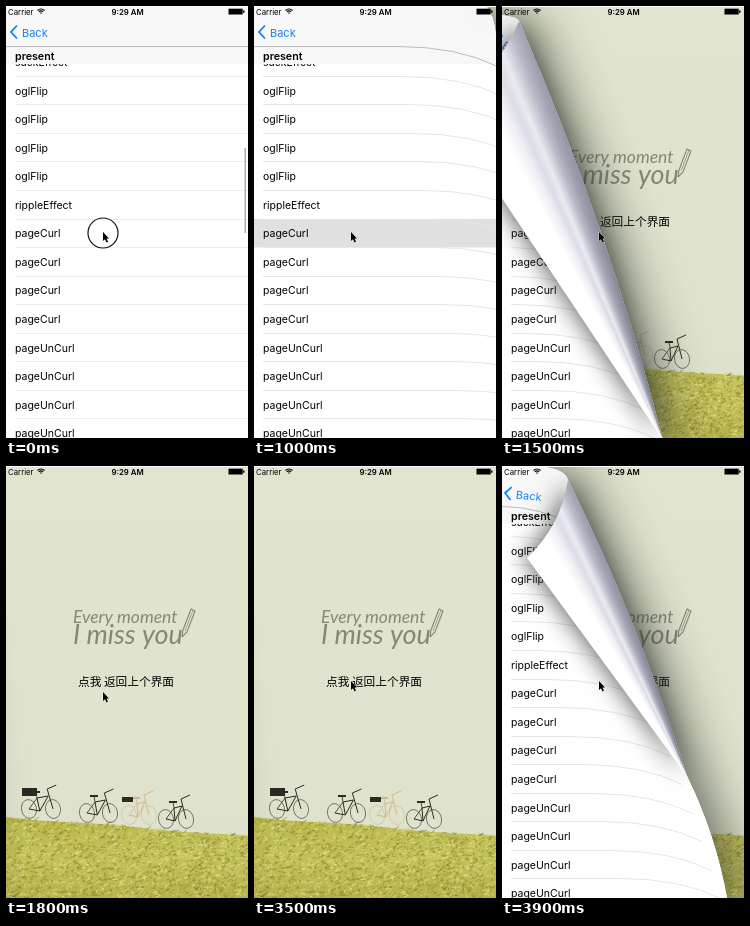
An HTML page with a canvas that plays this animation: 242x432 px, repeating every 4 s.

```html
<!DOCTYPE html>
<html lang="en">
<head>
<meta charset="utf-8">
<title>Page curl transition</title>
<style>
  html, body { margin: 0; width: 100%; height: 100%; overflow: hidden; background: #fff; }
  canvas { display: block; width: 242px; height: 432px; }
</style>
</head>
<body>
<canvas id="stage" width="242" height="432"></canvas>
<script>
const W = 242, H = 432, LOOP = 4000, STEP = 100;
const ctx = document.getElementById('stage').getContext('2d');
const UI = 'Inter, "Liberation Sans", sans-serif';
const ROWS = ['suckEffect', 'oglFlip', 'oglFlip', 'oglFlip', 'oglFlip', 'rippleEffect',
  'pageCurl', 'pageCurl', 'pageCurl', 'pageCurl',
  'pageUnCurl', 'pageUnCurl', 'pageUnCurl', 'pageUnCurl'];
const ROW_H = 28.55, FIRST_ROW = 56;

// Curl poses: progress, then x,y of top bend, roll top, loose corner, roll end, page edge.
const POSES = [
  [0,    242, 0,  242, 0,  242, 0,    242, 0,   242, 0],
  [.352, 70, 0,   132, 20, 128, 59,   196, 141, 243, 405],
  [.5,   25, 0,   66, 14,  25, 92,    185, 310, 225, 432],
  [.648, -30, 8,  17, 15,  -60, 102,  161, 434, 161, 434],
  [1,    -140, 8, -90, 20, -200, 150, -60, 440, -60, 440]
];

const clamp = v => Math.max(0, Math.min(1, v));
const mix = (a, b, k) => a + (b - a) * k;
const smooth = v => { v = clamp(v); return v * v * (3 - 2 * v); };

function text(g, str, x, y, font, color = '#000', align = 'left') {
  g.font = font;
  g.fillStyle = color;
  g.textAlign = align;
  g.textBaseline = 'alphabetic';
  g.fillText(str, x, y);
}

function line(g, color, width, ...pts) {
  g.strokeStyle = color;
  g.lineWidth = width;
  g.beginPath();
  for (let i = 0; i < pts.length; i += 2) g.lineTo(pts[i], pts[i + 1]);
  g.stroke();
}

function bike(g, x, y, w, color) {
  const wheel = cx => {
    g.strokeStyle = color + 'bb';
    g.lineWidth = .8;
    g.beginPath();
    g.ellipse(cx, y, 7.5, 9.5, -.2, 0, 7);
    g.stroke();
  };
  wheel(x);
  wheel(x + w);
  const mid = x + w * .45, head = x + w * .8;
  line(g, color, 1, x, y, mid, y + 2, head, y - 13, x + 8, y - 11, mid, y + 2);
  line(g, color, .8, x, y, x + 8, y - 11, x + 7, y - 17);
  line(g, color, 1, x + w, y, head - 1, y - 20, head + 8, y - 24);
  line(g, color, 2, x + 3, y - 17, x + 11, y - 17);
}

function paintScene(g) {
  const sky = g.createLinearGradient(0, 0, 0, 360);
  sky.addColorStop(0, '#e1e5cf');
  sky.addColorStop(1, '#dfe2cd');
  g.fillStyle = sky;
  g.fillRect(0, 0, W, H);

  bike(g, 23, 343, 24, '#2e2a22');
  g.fillStyle = '#2e2a22';
  g.fillRect(16, 322, 15, 8);
  bike(g, 81, 347, 23, '#2e2a22');
  bike(g, 123, 349, 20, '#d2b88c');
  g.fillStyle = '#2e2a22';
  g.fillRect(116, 331, 11, 5);
  bike(g, 160, 353, 20, '#2e2a22');

  const horizon = x => 351 + x * .08 + Math.sin(x / 22) * .7;
  const grass = g.createLinearGradient(0, 350, 0, H);
  grass.addColorStop(0, '#bab84c');
  grass.addColorStop(.5, '#c3c158');
  grass.addColorStop(1, '#b5b34c');
  g.fillStyle = grass;
  g.beginPath();
  g.moveTo(0, H);
  for (let x = 0; x <= W; x += 2) g.lineTo(x, horizon(x));
  g.lineTo(W, H);
  g.fill();

  let seed = 7;
  const rnd = () => (seed = seed * 16807 % 2147483647) / 2147483647;
  const tones = ['#85842a77', '#e6e49a99', '#6e6c2266', '#d8d57a99'];
  for (let i = 0; i < 2200; i++) {
    const x = rnd() * W, top = horizon(x), y = mix(top, H, rnd());
    line(g, tones[i % 4], 1.2, x, y, x + rnd() * 8 - 3, y - rnd() * 3);
  }

  const ink = '#85877a', hand = 'Lato, "Open Sans", sans-serif';
  text(g, 'Every moment', 67, 157, 'italic 17.5px ' + hand, ink);
  text(g, 'I miss you', 67, 178, 'italic 27px ' + hand, ink);
  line(g, ink, 1.1, 176, 171, 177, 164, 185, 143, 189, 145, 181, 166, 176, 171);
  line(g, ink, .7, 179, 165, 187, 144);

  text(g, '点我 返回上个界面', 120, 220, '11.7px "Noto Sans CJK SC", "Noto Sans CJK", sans-serif', '#000', 'center');
}

const scene = document.createElement('canvas');
scene.width = W;
scene.height = H;
paintScene(scene.getContext('2d'));

function poseAt(p) {
  const i = Math.max(1, POSES.findIndex(k => k[0] >= p));
  const a = POSES[i - 1], b = POSES[i], k = (p - a[0]) / (b[0] - a[0]);
  const pts = [];
  for (let j = 1; j < a.length; j += 2) pts.push([mix(a[j], b[j], k), mix(a[j + 1], b[j + 1], k)]);
  return pts;
}

// Curve from a to b, bowed sideways by a share of its length.
function bow(a, b, k) {
  const dx = b[0] - a[0], dy = b[1] - a[1];
  ctx.quadraticCurveTo((a[0] + b[0]) / 2 + dy * k, (a[1] + b[1]) / 2 - dx * k, b[0], b[1]);
}

function shade(alpha, blur, dx) {
  ctx.shadowColor = `rgba(44,52,46,${alpha})`;
  ctx.shadowBlur = blur;
  ctx.shadowOffsetX = dx;
}

// Rules of the list droop where the paper starts to roll.
function rule(x, y, color, pose) {
  ctx.strokeStyle = color;
  ctx.lineWidth = 1;
  ctx.beginPath();
  ctx.moveTo(x, y);
  if (pose) {
    const [, s, , j, b] = pose;
    const [from, to] = y < j[1] ? [s, j] : [j, b];
    const edge = from[0] + (to[0] - from[0]) * (y - from[1]) / (to[1] - from[1] || 1);
    const flat = Math.max(x, edge - 100);
    ctx.lineTo(flat, y);
    ctx.quadraticCurveTo(Math.max(flat, edge - 40), y, Math.max(flat, edge), y + 20);
  } else {
    ctx.lineTo(W, y);
  }
  ctx.stroke();
}

function paintList(p, glow, pose) {
  ctx.fillStyle = '#fff';
  ctx.fillRect(0, 0, W, H);
  ctx.fillStyle = `rgba(217,217,217,${glow})`;
  ctx.fillRect(0, 213, W, 28.5);
  const tint = pose ? '#e6e6e6' : '#efefef';
  ROWS.forEach((name, i) => {
    const y = FIRST_ROW + i * ROW_H;
    text(ctx, name, 9, y + 4, '10.5px ' + UI);
    rule(9, Math.floor(y + ROW_H / 2) + .5, tint, pose);
  });
  ctx.fillStyle = '#f8f8f8';
  ctx.fillRect(0, 0, W, 58);
  rule(0, 40.5, '#bcbcbc', pose);
  text(ctx, 'present', 9, 54, '600 10.7px ' + UI);

  const k = clamp((p - .4) / .25) ** 2;
  ctx.save();
  ctx.translate(-12 * k, 26 + 3 * k);
  ctx.rotate(.6 * k);
  line(ctx, '#1480f5', 1.8, 11, -6.5, 5, 0, 11, 6.5);
  text(ctx, 'Back', 16, 4.5, '11px ' + UI, '#1480f5');
  ctx.restore();

  if (!pose) {
    ctx.fillStyle = '#adadad';
    ctx.fillRect(238.5, 142, 1.5, 85);
  }
}

function paintCurl(p, glow) {
  const pose = poseAt(p), [a, s, c, j, b] = pose;

  ctx.save();
  ctx.beginPath();
  ctx.moveTo(-300, a[1]);
  ctx.lineTo(...a);
  ctx.quadraticCurveTo(s[0] - 4, a[1], ...s);
  bow(s, j, .04);
  bow(j, b, .07);
  ctx.lineTo(b[1] < H ? W : b[0], H + 9);
  ctx.lineTo(-300, H + 9);
  ctx.fillStyle = '#fff';
  shade(.65, 48, 13);
  ctx.fill();
  shade(0, 0, 0);
  ctx.clip();
  paintList(p, glow, pose);
  ctx.restore();

  // Underside of the paper, shaded in rays from the end of the roll.
  ctx.save();
  ctx.beginPath();
  ctx.moveTo(...s);
  bow(s, j, .04);
  ctx.lineTo(...c);
  bow(c, s, -.17);
  const start = Math.atan2(c[1] - j[1], c[0] - j[0]);
  const span = (Math.atan2(s[1] - j[1], s[0] - j[0]) - start) / (2 * Math.PI);
  const back = ctx.createConicGradient(start, ...j);
  [[0, '#ffffff'], [.4, '#ffffff'], [.55, '#f0f0f5'], [.66, '#dcdce6'], [.76, '#eaeaf0'],
   [.9, '#b9bac8'], [1, '#a0a2b0'], [1.25, '#7c7f8c']]
    .forEach(([k, color]) => back.addColorStop(clamp(k * span), color));
  back.addColorStop(.8, '#7c7f8c');
  back.addColorStop(.81, '#ffffff');
  ctx.fillStyle = back;
  shade(.75, 24, -3);
  ctx.fill();
  ctx.restore();
}

function paintStatus() {
  ctx.fillStyle = '#fff';
  ctx.fillRect(0, 0, W, 1);
  text(ctx, 'Carrier', 2, 8.5, '7.8px ' + UI);
  text(ctx, '9:29 AM', 121.5, 8.5, '600 7.8px ' + UI, '#000', 'center');
  ctx.strokeStyle = '#000';
  ctx.lineWidth = 1.2;
  for (const r of [1, 3, 5]) {
    ctx.beginPath();
    ctx.arc(35, 8, r, -2.36, -.78);
    ctx.stroke();
  }
  ctx.fillStyle = '#000';
  ctx.fillRect(222.5, 2.7, 14.2, 5.8);
  ctx.fillRect(237, 4.5, 1.5, 2.2);
}

function paintCursor(t) {
  const k = clamp((t - 2100) / 400), m = clamp((t - 2500) / 200);
  const x = 97 + k - m, y = 227 - 8 * k - 3 * m;
  if (t < 300 || (t >= 2900 && t < 3200)) {
    ctx.strokeStyle = '#111';
    ctx.lineWidth = 1.2;
    ctx.beginPath();
    ctx.arc(x, y, 15, 0, 7);
    ctx.stroke();
  }
  ctx.save();
  ctx.translate(x, y);
  ctx.beginPath();
  [[0, -1], [0, 8], [2, 6.2], [3.5, 9.5], [5, 8.8], [3.6, 5.6], [6, 5.5]].forEach(q => ctx.lineTo(...q));
  ctx.closePath();
  ctx.strokeStyle = '#ffffffaa';
  ctx.lineWidth = 1;
  ctx.stroke();
  ctx.fillStyle = '#000';
  ctx.fill();
  ctx.restore();
}

function paint(t) {
  const p = t < 2400 ? smooth((t - 900) / 1000) : 1 - smooth((t - 3400) / 1000);
  const glow = t >= 300 && t < 2000 ? clamp((1450 - t) / 550) : 0;
  ctx.drawImage(scene, 0, 0);
  if (p <= 0) paintList(0, glow);
  else if (p < 1) paintCurl(p, glow);
  paintStatus();
  paintCursor(t);
}

const begin = performance.now();
function tick() {
  const t = (performance.now() - begin) % LOOP;
  paint(Math.floor(t / STEP) * STEP);
  requestAnimationFrame(tick);
}
tick();
</script>
</body>
</html>
```
